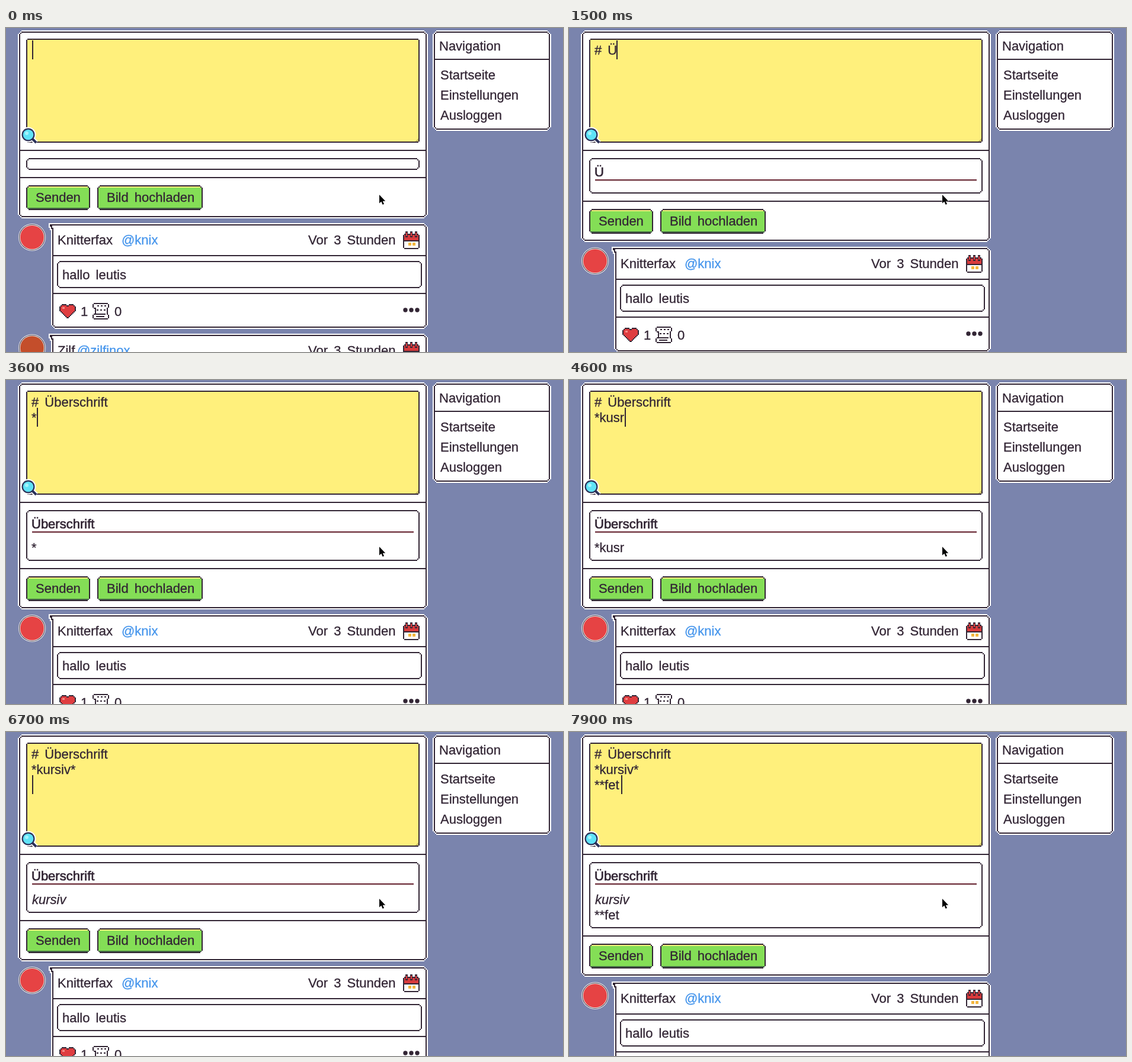
An HTML page that plays this animation: 940 by 548 pixels, repeating every 8 s.

```html
<!DOCTYPE html>
<html lang="de">
<head>
<meta charset="utf-8">
<title>Editor</title>
<style>
  html, body { margin: 0; width: 100%; height: 100%; overflow: hidden; background: #7a84ad; }
  svg { display: block; width: 940px; height: 548px; shape-rendering: crispEdges; }
  text { font: 22px "Liberation Sans", Arial, sans-serif; word-spacing: 4px; white-space: pre;
    fill: #322534; stroke: #322534; stroke-width: .3px; }
  .link { fill: #4595ec; stroke: #4595ec; }
  .em { font-style: italic; }
  .head { stroke-width: .7px; }
  .smooth { shape-rendering: auto; }
</style>
</head>
<body>
<svg id="stage" viewBox="0 0 940 548"></svg>
<script>
const INK = '#322534', WHITE = '#fff', YELLOW = '#fff07c', GREEN = '#84de56', RED = '#e64344';
const LOOP = 8000, LEFT = 44, LINE = 26;

const path = (d, fill) => `<path d="${d}" fill="${fill}"/>`;
const rect = (x, y, w, h, fill = INK) => `<rect x="${x}" y="${y}" width="${w}" height="${h}" fill="${fill}"/>`;
const disc = (x, y, r, fill) => `<circle cx="${x}" cy="${y}" r="${r}" fill="${fill}"/>`;
const smooth = s => `<g class="smooth">${s}</g>`;
const esc = s => s.replace(/&/g, '&amp;').replace(/</g, '&lt;');
const label = (x, y, s, cls = '') => `<text x="${x}" y="${y}" class="${cls}">${esc(s)}</text>`;

// Rectangle whose corners are n stairs of 2px
function stair(x, y, w, h, n, fill) {
  const c = 2 * n;
  return path(`M${x + c} ${y}H${x + w - c}${'v2h2'.repeat(n)}V${y + h - c}${'h-2v2'.repeat(n)}` +
    `H${x + c}${'v-2h-2'.repeat(n)}V${y + c}${'h2v-2'.repeat(n)}z`, fill);
}
const box = (x, y, w, h, fill = WHITE, n = 2) =>
  stair(x, y, w, h, n, INK) + stair(x + 2, y + 2, w - 4, h - 4, n - 1, fill);
const panel = (x, y, w, h) => stair(x - 2, y - 2, w + 4, h + 4, 3, WHITE) + box(x, y, w, h);

const button = (x, w, s) => box(x, 266, w, 42, GREEN) + rect(x + 4, 268, w - 8, 2, '#f2f07a') +
  rect(x + 2, 304, w - 4, 2, '#456a45') + label(x + 16, 294, s);

const calendar = (x, y) =>
  stair(x, y + 4, 28, 26, 1, INK) + rect(x + 2, y + 6, 24, 9, '#d83a3c') + rect(x + 2, y + 17, 24, 11, WHITE) +
  [4, 12, 20].map(i => rect(x + i, y, 4, 10) + rect(x + i + 1, y + 2, 2, 6, RED)).join('') +
  [9, 16].map(i => rect(x + i, y + 19, 5, 5, '#f4b73f')).join('');

// Heart whose point is built from n stairs
const lobes = (x, y, top, n, fill) =>
  path(`M${x + 4} ${y + top}h8v2h4v-2h8v2h2${top ? '' : 'v2h2'}V${y + 12}${'h-2v2'.repeat(n)}h-4` +
    `${'v-2h-2'.repeat(n)}V${y + 4}h2${top ? '' : 'v-2h2'}z`, fill);
const heart = (x, y) => lobes(x, y, 0, 6, INK) + lobes(x, y, 2, 5, '#df3d40') + rect(x + 5, y + 5, 4, 3, '#f58d87');

const scroll = (x, y) =>
  box(x, y, 28, 10, WHITE, 1) + box(x + 4, y + 8, 22, 12, WHITE, 1) + box(x, y + 18, 28, 10, WHITE, 1) +
  rect(x + 6, y + 6, 18, 6, WHITE) + rect(x + 6, y + 16, 18, 4, WHITE) +
  [4, 11].map((r, k) => [8, 14, 20].map(i => rect(x + i - k, y + r, 3, 2)).join('')).join('') +
  rect(x + 4, y + 18, 18, 2) + rect(x + 6, y + 22, 14, 2);

const avatar = (x, y, fill) =>
  smooth(disc(x, y, 23, WHITE) + disc(x, y, 22, INK) + disc(x, y, 21, WHITE) + disc(x, y, 20, fill));

const post = (dy, color, name, tag, tagX, body) => `<g transform="translate(0 ${dy})">` +
  avatar(44, 354, color) + panel(78, 332, 632, 175) +
  path('M72 330H86V346H76V342H74V338H72z', WHITE) +
  path('M74 332h12v2h-8v4h2v8h-2v-6h-2v-4h-2z', INK) +
  label(87, 366, name) + label(tagX, 366, tag, 'link') + label(510, 366, 'Vor 3 Stunden') + calendar(670, 344) +
  rect(80, 384, 628, 2) + box(86, 394, 616, 46) + label(95, 425, body) + rect(80, 448, 628, 2) +
  heart(90, 467) + label(126, 487, '1') + scroll(146, 465) + label(183, 487, '0') +
  [674, 684, 694].map(x => smooth(disc(x, 477, 3.7, INK))).join('') + '</g>';

const handle = (color, w) => `<path d="M44 187L51 194" stroke="${color}" stroke-width="${w}"/>`;
const magnifier = smooth(handle(WHITE, 8) + disc(37.5, 180.5, 13, WHITE) + handle('#2b3158', 4) +
  disc(37.5, 180.5, 11, '#2b3158') + disc(37.5, 180.5, 8.8, '#5fe3f7') + disc(35, 178, 3, '#a5f4fc'));

const nav = panel(722, 6, 196, 166) + rect(724, 52, 192, 2) + label(731, 38, 'Navigation') +
  ['Startseite', 'Einstellungen', 'Ausloggen'].map((s, i) => label(733, 87 + 34 * i, s)).join('');

const pointer = `<path class="smooth" d="M630 282v14.5l3.3-3 2.3 5.2 2.4-1-2.2-5h4.4z"
  fill="#000" stroke="#fff" stroke-width="1" paint-order="stroke"/>`;

const stage = document.getElementById('stage');
stage.innerHTML = '<g id="form"></g>' +
  '<g id="below">' + rect(24, 252, 684, 2) + button(34, 108, 'Senden') + button(154, 178, 'Bild hochladen') +
  post(0, RED, 'Knitterfax', '@knix', 195, 'hallo leutis') +
  post(187, '#c44e2b', 'Zilf', '@zilfinox', 120, 'hallo') + '</g>' +
  rect(24, 206, 684, 2) + box(34, 18, 664, 176, YELLOW, 1) +
  path('M696 186v6h-6z', '#c9bd66') + magnifier +
  '<g id="typed"></g><g id="preview"></g>' + nav + pointer;
const part = id => document.getElementById(id);

// [time, typed text, caret hidden]
const H = '# Überschrift', K = H + '\n*kursiv*';
const steps = [
  [0, ''], [200, '', 1], [700, '#'], [900, '# '], [1400, '# ', 1], [1500, '# Ü'],
  [1800, '# Üb'], [1900, '# Übe'], [2000, '# Über'], [2200, '# Übers'], [2400, '# Übersc'],
  [2700, '# Übersch'], [2800, '# Überschri'], [2900, '# Überschrif'], [3000, H],
  [3400, H + '\n'], [3600, H + '\n*'], [3900, H + '\n*k'], [4300, H + '\n*ku'],
  [4400, H + '\n*kus'], [4600, H + '\n*kusr'], [5200, H + '\n*kus'], [5500, H + '\n*ku'],
  [5700, H + '\n*kur'], [5900, H + '\n*kurs'], [6000, H + '\n*kursi'], [6200, H + '\n*kursiv'],
  [6400, K], [6700, K + '\n'], [7200, K + '\n', 1], [7300, K + '\n**'],
  [7600, K + '\n**f'], [7700, K + '\n**fe'], [7900, K + '\n**fet']
];

// Caret advance per character, 12 unless listed
const advance = { ' ': 10, 'Ü': 14, k: 10, '*': 8, r: 8, f: 8, t: 8, i: 4 };
const caretX = line => [...line].reduce((x, c) => x + (advance[c] || 12), LEFT);

// Small Markdown subset; returns the markup and its height
function render(src) {
  let out = '', y = 0;
  for (const line of src.trim().split('\n').filter(Boolean)) {
    const base = 251 + y;
    if (line.startsWith('# ')) {
      out += label(LEFT - 1, base, line.slice(2), 'head') +
        rect(LEFT, 256, 644, 2, '#6f2d3b') + rect(LEFT, 258, 644, 1, '#d3c9c6');
      y += 14;
    } else {
      const em = /^\*([^*]+)\*$/.exec(line);
      out += em ? label(LEFT, base, em[1], 'em') : label(LEFT - 1, base, line);
    }
    y += LINE;
  }
  return { out, height: y };
}

function show([, text, hidden]) {
  const lines = text.split('\n'), row = lines.length - 1;
  const { out, height } = render(text);
  part('form').innerHTML = panel(22, 6, 688, 314 + height);
  part('below').setAttribute('transform', `translate(0 ${height})`);
  part('typed').innerHTML = lines.map((s, i) => label(LEFT - 1, 45 + LINE * i, s)).join('') +
    (hidden ? '' : rect(caretX(lines[row]), 21 + LINE * row, 2, 32));
  part('preview').innerHTML = box(34, 220, 664, 20 + height) + out;
}

let current;
function tick() {
  const t = performance.now() % LOOP;
  const step = steps.findLast(s => s[0] <= t);
  if (step !== current) show(current = step);
  requestAnimationFrame(tick);
}
tick();
</script>
</body>
</html>
```
